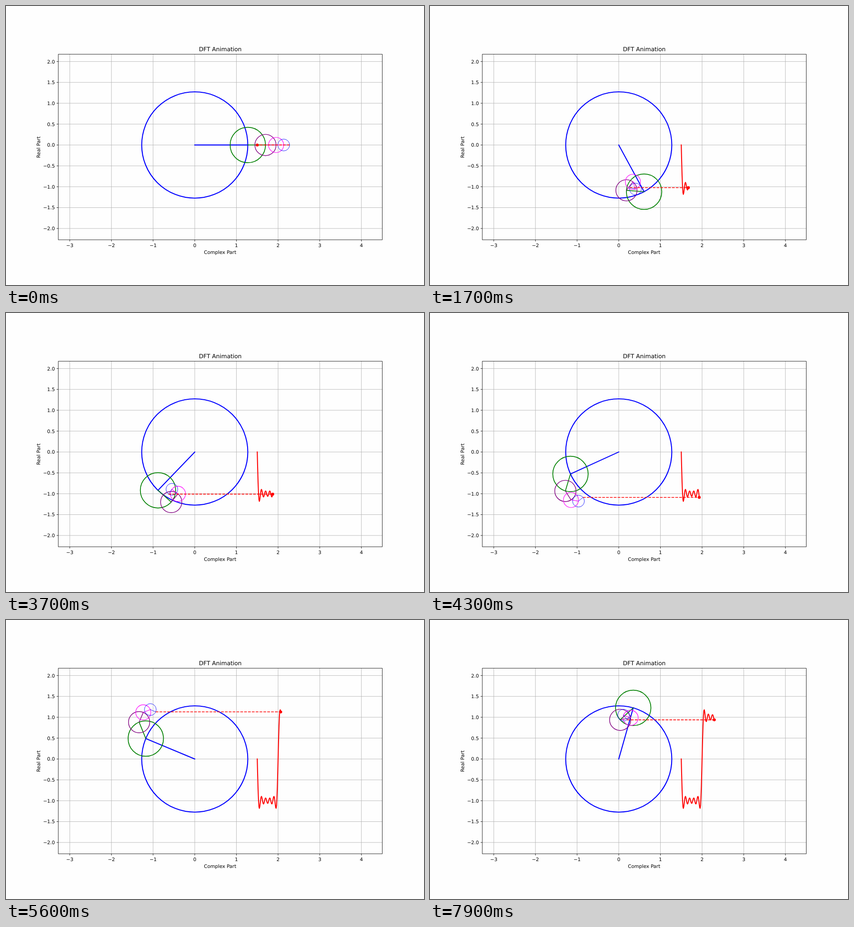
An HTML page that plays this animation: 917x611 px, repeating every 8000 ms.

```html
<!DOCTYPE html>
<html lang="en">
<head>
<meta charset="utf-8">
<title>DFT Animation</title>
<style>
  html, body { margin: 0; width: 100%; height: 100%; overflow: hidden; background: #fefefe; }
  svg { display: block; width: 917px; height: 611px; }
  text { font-family: "DejaVu Sans", sans-serif; font-size: 10.61px; text-rendering: geometricPrecision; }
</style>
</head>
<body>
<svg id="stage" viewBox="0 0 917 611"></svg>
<script>
const LOOP = 8000, FRAME = 100, STEP = 2 / 199;
const PT = 917 / 12 / 72;
const UNIT = 91.4;
const BOX = { left: 114.8, top: 105.7, right: 825.4, bottom: 512 };
const X0 = 414.1, Y0 = 304.4;
const px = x => X0 + x * UNIT;
const py = y => Y0 - y * UNIT;

const stage = document.getElementById('stage');

function add(tag, attrs, text) {
  const el = document.createElementNS('http://www.w3.org/2000/svg', tag);
  set(el, attrs);
  if (text !== undefined) el.textContent = text;
  return stage.appendChild(el);
}

function set(el, attrs) {
  for (const key in attrs) el.setAttribute(key, attrs[key]);
}

function line(x1, y1, x2, y2, stroke, width) {
  return add('line', { x1, y1, x2, y2, stroke, 'stroke-width': width * PT });
}

function label(x, y, text, anchor = 'middle', extra = {}) {
  add('text', { x, y, 'text-anchor': anchor, ...extra }, text);
}

const signed = (v, digits) => v.toFixed(digits).replace('-', '\u2212');

// Axes, grid and labels
for (let v = -3; v <= 4; v++) {
  const x = px(v);
  line(x, BOX.top, x, BOX.bottom, '#b0b0b0', 0.8);
  line(x, BOX.bottom, x, BOX.bottom + 3.5 * PT, '#000', 0.8);
  label(x, 527.6, signed(v, 0));
}
for (let v = -2; v <= 2; v += 0.5) {
  const y = py(v);
  line(BOX.left, y, BOX.right, y, '#b0b0b0', 0.8);
  line(BOX.left - 3.5 * PT, y, BOX.left, y, '#000', 0.8);
  label(BOX.left - 7.6, y + 3.9, signed(v, 1), 'end');
}
const midX = (BOX.left + BOX.right) / 2, midY = (BOX.top + BOX.bottom) / 2;
label(midX, 98.6, 'DFT Animation', 'middle', { style: 'font-size:12.74px' });
label(midX - 0.4, 543.2, 'Complex Part');
label(0, 0, 'Real Part', 'middle', { transform: `translate(74.8 ${midY + 0.4}) rotate(-90)` });

// Odd harmonics of a square wave
const arms = [['blue', 2], ['green', 1.65], ['purple', 1.35], ['magenta', 1.1], ['blue', 0.8]]
  .map(([color, width], i) => {
    const order = 2 * i + 1;
    const radius = 4 / (Math.PI * order) * UNIT;
    const circle = add('circle', { r: radius, fill: 'none', stroke: color, 'stroke-width': width * PT });
    const spoke = line(0, 0, 0, 0, color, width);
    set(spoke, { 'stroke-linecap': 'square' });
    return { order, radius, circle, spoke };
  });

const link = line(0, 0, 0, 0, 'red', 1.5);
set(link, { 'stroke-dasharray': `${3.7 * 1.5 * PT} ${1.6 * 1.5 * PT}` });
const trace = add('polyline', {
  fill: 'none', stroke: 'red', 'stroke-width': 2 * PT,
  'stroke-linejoin': 'round', 'stroke-linecap': 'square'
});
const dot = add('circle', { r: 3 * PT, fill: 'red' });
add('rect', {
  x: BOX.left, y: BOX.top, width: BOX.right - BOX.left, height: BOX.bottom - BOX.top,
  fill: 'none', stroke: '#000', 'stroke-width': 0.8 * PT
});

const angleAt = n => 2 * Math.PI * STEP * n;
const waveX = n => px(1.5 + STEP * n);
const waveY = n => arms.reduce((y, a) => y + a.radius * Math.sin(a.order * angleAt(n)), Y0);

function draw(n) {
  let x = X0, y = Y0;
  for (const arm of arms) {
    const angle = arm.order * angleAt(n);
    const x2 = x + arm.radius * Math.cos(angle);
    const y2 = y + arm.radius * Math.sin(angle);
    set(arm.circle, { cx: x, cy: y });
    set(arm.spoke, { x1: x, y1: y, x2, y2 });
    x = x2;
    y = y2;
  }
  const endX = waveX(n);
  set(link, { x1: x, y1: y, x2: endX, y2: y });
  set(dot, { cx: endX, cy: y });
  const points = [];
  for (let i = 0; n > 0 && i <= n; i++) points.push(`${waveX(i)},${waveY(i)}`);
  set(trace, { points: points.join(' ') });
}

const start = performance.now();
function tick() {
  draw(Math.floor((performance.now() - start) % LOOP / FRAME));
  requestAnimationFrame(tick);
}
tick();
</script>
</body>
</html>
```
